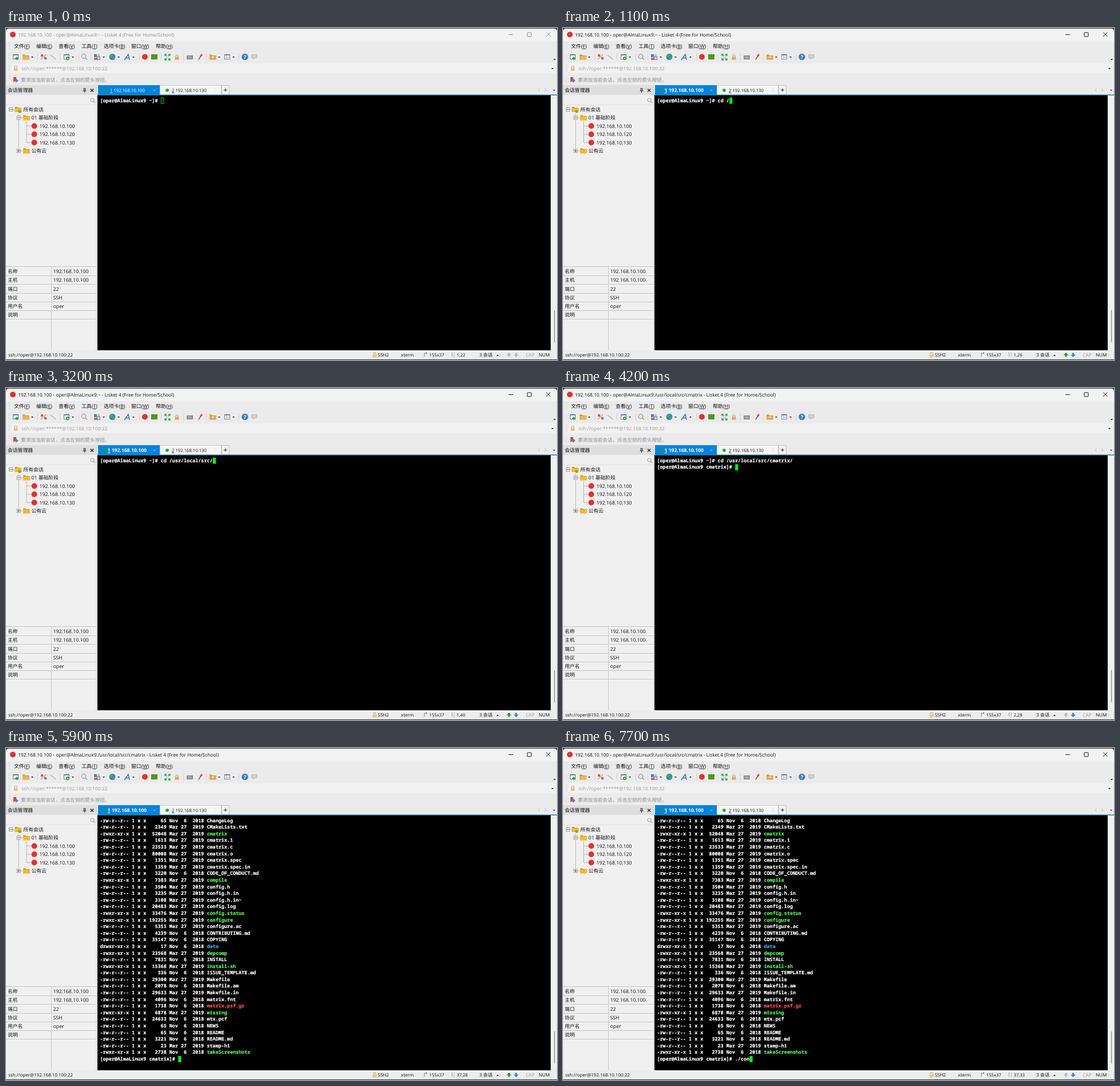
An HTML page for the animation above (8 s loop, 964x581 px).

```html
<!DOCTYPE html>
<html lang="zh">
<head>
<meta charset="utf-8">
<title>Terminal session</title>
<style>
html, body { margin: 0; width: 100%; height: 100%; overflow: hidden; background: #333; }
svg { display: block; width: 964px; height: 581px; }
text { font-family: "Open Sans", "Noto Sans CJK SC", "Noto Sans CJK", sans-serif; text-rendering: geometricPrecision; }
.term text { font: bold 8.44px "Noto Sans Mono", "DejaVu Sans Mono", monospace; }
.term text, .term tspan { fill: currentColor; stroke: currentColor; stroke-width: .2px; }
</style>
</head>
<body>
<svg id="stage" viewBox="0 0 964 581"></svg>
<script>
const LOOP = 8000, CELL = 5.065, ROW = 11.59, LEFT = 164.5, TOP = 121.8;
const USER = 'oper', IP = '192.168.10.100', APP = 'Lisket 4 (Free for Home/School)';

const keepSpaces = s => s.replace(/ /g, '\u00a0');
const rect = (x, y, w, h, fill, extra = '') => `<rect x="${x}" y="${y}" width="${w}" height="${h}" fill="${fill}" ${extra}/>`;
const box = (x, y, w, h, stroke, fill = 'none') => rect(x + .5, y + .5, w - 1, h - 1, fill, `stroke="${stroke}"`);
const circle = (x, y, r, fill, extra = '') => `<circle cx="${x}" cy="${y}" r="${r}" fill="${fill}" ${extra}/>`;
const path = (d, stroke, width = 1, extra = '') => `<path d="${d}" stroke="${stroke}" stroke-width="${width}" fill="none" ${extra}/>`;
const shape = (d, fill) => `<path d="${d}" fill="${fill}"/>`;
const text = (x, y, s, size = 8.75, fill = '#111', extra = '') =>
  `<text x="${x}" y="${y}" font-size="${size}" fill="${fill}" ${extra}>${s}</text>`;
const underlined = s => `<tspan text-decoration="underline">${s}</tspan>`;
const caret = (x, y) => shape(`M${x - 2} ${y - 1}h4l-2 2.3z`, '#222');
const folder = (x, y, fill = '#f7b92c') =>
  shape(`M${x} ${y - 4.5}h4l1.5 1.5h6v7.5h-11.5z`, '#e09b1a') + rect(x, y - 2, 11.5, 6, fill, 'rx=".8"');
const lock = (x, y, fill) => path(`M${x - 2} ${y}v-2a2 2 0 0 1 4 0v2`, '#c9a063', 1.1) + rect(x - 3.5, y - .5, 7, 5, fill, 'rx=".6"');
const lens = (x, y, r, color) => circle(x, y, r, 'none', `stroke="${color}" stroke-width="1.1"`) +
  path(`M${x + r * .7} ${y + r * .7}l3 3`, color, 1.4);
const expander = (x, y, plus) => box(x - 3.5, y - 3.5, 7, 7, '#999', '#fafafa') +
  path(`M${x - 2} ${y}h4${plus ? `M${x} ${y - 2}v4` : ''}`, '#333', .9);

function frame() {
  return rect(0, 0, 964, 581, '#333') + rect(0, 1, 964, 579, '#ebebeb', 'rx="5"') +
    shape('M0 23V6a5 5 0 0 1 5-5H959a5 5 0 0 1 5 5V23z', '#f3f3f3') +
    circle(12, 11.5, 5, '#e8302c');
}

function menus() {
  const items = [[14, '文件', 'F'], [53, '编辑', 'E'], [92, '查看', 'V'], [132, '工具', 'T'],
    [171, '选项卡', 'B'], [219, '窗口', 'W'], [262, '帮助', 'H']];
  return items.map(([x, word, key]) => text(x, 35, `${word}(${underlined(key)})`, 8.9)).join('');
}

function toolbar() {
  const grips = [26, 45, 65, 85].map(y => path(`M5.5 ${y}v11`, '#bbb', 1, 'stroke-dasharray="1 2"')).join('');
  const dividers = [55, 94, 127, 148, 233, 271, 310, 350, 407].map(x => path(`M${x}.5 44v13`, '#d2d2d2')).join('');
  const carets = [46, 117, 171, 197, 223, 373, 398].map(x => caret(x, 51)).join('');
  const windowIcon = (x, color) => box(x, 46, 10, 9, color, '#fff') + rect(x, 46, 10, 2, color);
  return grips + dividers + carets +
    windowIcon(12, '#5d7f9d') + path('M19 50v6M16 53h6', '#27a345', 1.8) +
    folder(29, 51, '#e9b25f') +
    path('M62 47l3 3M67 51l3 3', '#d9463e', 2) + box(61, 46, 4, 4, '#cf5b55') + box(67, 51, 4, 4, '#777') +
    path('M70 46l-4 4M65 51l-4 4', '#e04a40') +
    path('M78 47l4 4M82 50l5 5', '#c4c4c4', 2.4) +
    windowIcon(101, '#5d7f9d') + circle(108, 53, 3.2, '#45a83f') + circle(108, 53, 1.1, '#eee') +
    lens(136, 49.5, 3.8, '#8a8a8a') +
    rect(154, 46, 5, 5, '#477fb8') + rect(160, 46, 4, 4, '#bbb') + rect(154, 52, 5, 4, '#d6604e') + box(159, 50, 6, 6, '#5480a8', '#dbe7f2') +
    circle(186, 50.5, 5.5, '#2c83c7') + shape('M182 47l4-1 1 3-3 3-3-1zM187 51l4-1-2 5-3-1z', '#4dad51') +
    path('M207 56l7-10 2 10M210 52.5h5', '#2e72b3', 1.5) +
    circle(243, 50.5, 5, '#e8302c') + rect(254, 46, 11, 9, '#4c9a13') +
    path('M278 49v-3h3M278 46l3.5 3.5M287 49v-3h-3M287 46l-3.5 3.5M278 53v3h3M278 56l3.5-3.5M287 53v3h-3M287 56l-3.5-3.5', '#2ca03e', 1.3) +
    lock(299, 51, '#dba565') +
    rect(316, 48, 11, 7, '#858585', 'rx=".5"') + path('M317.5 50.5h8M317.5 52.7h8', '#ddd', .8) +
    path('M337 55l4-6', '#777', 2) + path('M340 50l3-4', '#d8534d', 3) +
    folder(356, 51, '#e4a456') + path('M362 49v4M360 51h4', '#fff') +
    windowIcon(382, '#70879b') + path('M386 48v7M386 51h6', '#8ca0b1') +
    circle(418, 50.5, 5.7, '#397fc6') + text(416, 54, '?', 9, '#fff', 'font-weight="bold"') +
    rect(429, 46, 11, 7, '#c3c3c3', 'rx="2"') + shape('M432 53h4l-4 3z', '#c3c3c3') + path('M431 48.5h7M431 50.5h7', '#eee', .7) +
    caret(960, 55);
}

function addressBar() {
  return rect(9, 62, 953, 17, '#f2f2f2') + lock(17, 70.5, '#edc184') +
    text(27, 74, `ssh://${USER}:******@${IP}:22`, 8.5, '#999') + caret(956, 71) +
    shape('M13 86h5v9l-2.5-2-2.5 2z', '#d8423d') + shape('M17 88l5 4-5 4z', '#4c83cf') +
    text(26, 94, '要添加当前会话，点击左侧的箭头按钮。', 8.65, '#8e8e8e');
}

function sidebar() {
  const tree = [[IP, 171.5], ['192.168.10.120', 186], ['192.168.10.130', 200.5]].map(([ip, y]) =>
    path(`M36 ${y}h8`, '#b5b5b5') + circle(49.5, y, 5, '#e8302c') + text(58.5, y + 3.1, ip)).join('');
  const facts = [['名称', IP], ['主机', IP], ['端口', '22'], ['协议', 'SSH'], ['用户名', USER], ['说明', '']];
  const table = facts.map(([name, value], i) => {
    const y = 418 + i * 15.25;
    return path(`M0 ${Math.round(y + 15) + .5}H158`, '#c6c6c6') + text(3, y + 11, name) + text(82.5, y + 11, value);
  }).join('');
  return rect(0, 100, 158, 17, '#dedede') + rect(0, 117, 159, 447, '#f0f0f0') +
    text(3, 112, '会话管理器', 8.8) +
    path('M135.5 106h4M136.5 106v4M138.8 106v4M134.5 110h6M137.5 110v3', '#222') +
    path('M148 106.5l5 5M153 106.5l-5 5', '#222', 1.3) +
    path('M0 134.5H158', '#e0e0e0') + lens(151, 126, 3, '#aaa') +
    path('M8.5 142.5h7M22 149v66M22 157h8M22 215h8M36 163v37.5', '#b5b5b5') +
    expander(8.5, 142.5) + folder(15.5, 142.5) + circle(24, 146, 2.7, '#79b532') + text(30.5, 145.8, '所有会话') +
    expander(22, 157) + folder(30, 157) + text(44.5, 160.2, '01 基础阶段') +
    tree + expander(22, 215, true) + folder(30, 215) + text(44.5, 218.3, '公有云') +
    path('M0 417.5H158M79.5 418V564', '#c6c6c6') + table + path('M158.5 100V564', '#d5d5d5');
}

function tabs() {
  return rect(160, 100, 804, 17, '#ebebeb') + rect(161, 100, 108, 17, '#0583e0') +
    box(269, 100, 108, 18, '#cfcfcf', '#f5f5f5') + box(377, 100, 14, 17, '#bdbdbd', '#f2f2f2') +
    rect(160, 116.5, 804, 1.5, '#2381ac') +
    circle(173, 109, 2.7, '#10a526') + circle(282, 109, 2.8, '#12ac1b') +
    text(290, 112, `${underlined(2)} 192.168.10.130`, 7.7) +
    path('M257.5 107l4 4M261.5 107l-4 4', '#8fc8f4', .8) + path('M365.5 107l4 4M369.5 107l-4 4', '#ddd', .8) +
    path('M381 108.5h6M384 105.5v6', '#333', 1.2) +
    path('M934 106l-3 2.5 3 2.5M942 106l3 2.5-3 2.5', '#bbb') + caret(959, 109);
}

function statusBar() {
  return rect(0, 564, 964, 16, '#ededed') +
    text(4, 575, `ssh://${USER}@${IP}:22`, 7.97) + lock(645, 572, '#f4c484') + text(650.5, 575, 'SSH2', 8.1) +
    text(691, 575, 'xterm', 8) + path('M732 575v-6h5M735 567.5l2 1.5-2 1.5', '#777', .9) + text(740.5, 575, '155x37', 7.75) +
    path('M780.5 568v7M783 569h2M783 572h2M783 575h2', '#999') + text(828, 575, '3 会话', 8.2) +
    shape('M858 574h4l-2-2.5z', '#222') + text(909.5, 575, 'CAP', 8.1, '#999') + text(932, 575, 'NUM', 8.1);
}

// Each entry: size, month (N/M), optional kind (x executable, d directory, z archive), name.
const listing = `65N ChangeLog|2349M CMakeLists.txt|52048Mx cmatrix|1613M cmatrix.1|23533M cmatrix.c|80008M cmatrix.o
1351M cmatrix.spec|1359M cmatrix.spec.in|3220N CODE_OF_CONDUCT.md|7383Mx compile|3504M config.h|3235M config.h.in
3108M config.h.in~|20483M config.log|33476Mx config.status|192255Mx configure|5351M configure.ac|4239N CONTRIBUTING.md
35147N COPYING|17Nd data|23568Mx depcomp|7831N INSTALL|15368Mx install-sh|336N ISSUE_TEMPLATE.md|29300M Makefile
2078N Makefile.am|29633M Makefile.in|4096N matrix.fnt|1738Nz matrix.psf.gz|6878Mx missing|24633N mtx.pcf|65N NEWS
65N README|3221N README.md|23M stamp-h1|2738Nx takeScreenshots`.split(/[|\n]/);
const kindColor = { x: '#55ff55', d: '#45a9e6', z: '#ff5555' };
const dates = { N: 'Nov  6  2018', M: 'Mar 27  2019' };

const termText = (row, s) => `<text x="${LEFT}" y="${TOP + row * ROW + 7.9}" color="#fff">${s}</text>`;

function listingRow(entry, row) {
  const [, size, month, kind, name] = entry.match(/^(\d+)([NM])(\w?) (.+)$/);
  const mode = kind === 'd' ? 'drwxr-xr-x 3' : kind === 'x' ? '-rwxr-xr-x 1' : '-rw-r--r-- 1';
  return termText(row, keepSpaces(`${mode} x x ${size.padStart(6)} ${dates[month]} `) +
    `<tspan color="${kindColor[kind] || '#fff'}">${name}</tspan>`);
}

const homePrompt = `[${USER}@AlmaLinux9 ~]# `, srcPrompt = `[${USER}@AlmaLinux9 cmatrix]# `;
const keys = {
  cd: [[300, 'c'], [500, 'd'], [600, ' '], [1100, '/'], [1300, 'u'], [1500, 'sr/'], [1700, 'l'], [1900, 'o'], [2100, 'cal/'],
    [2500, 's'], [2800, 'r'], [3000, 'c'], [3200, '/'], [3500, 'c'], [3700, 'm'], [4100, 'atrix/']],
  ll: [[5600, 'l'], [5700, 'l']],
  run: [[6500, '.'], [6700, '/'], [7300, 'c'], [7400, 'o'], [7500, 'n']]
};
const FOCUS = 200, CD_DONE = 4200, LL_DONE = 5900;
const sendToggles = [300, 800, 1100, 1400, 1500, 2000, 2100, 2700, 2800, 3400, 3500, 3900, 4100, 4200,
  5600, 6000, 6500, 6600, 6700, 6900, 7300, 7700];
const typed = (list, t) => list.filter(([at]) => at <= t).map(([, s]) => s).join('');

function screenRows(t) {
  const first = homePrompt + typed(keys.cd, t);
  if (t < CD_DONE) return { lines: [first], row: 0 };
  if (t < LL_DONE) return { lines: [first, srcPrompt + typed(keys.ll, t)], row: 1 };
  return { lines: [srcPrompt + typed(keys.run, t)], row: 36, listed: true };
}

const stage = document.getElementById('stage');
stage.innerHTML = frame() + menus() + toolbar() + addressBar() + sidebar() + tabs() +
  rect(160, 118, 793, 446, '#000') + rect(953, 118, 11, 446, '#f0f0f0') + statusBar() +
  '<g id="chrome"></g><g class="term"><g id="files"></g><g id="console"></g></g>';
const [chrome, files, consoleLayer] = ['chrome', 'files', 'console'].map(id => document.getElementById(id));
files.innerHTML = listing.map(listingRow).join('');

function draw(t) {
  const active = t >= FOCUS, ink = active ? '#111' : '#8c8c8c';
  const { lines, row, listed } = screenRows(t);
  const col = lines[lines.length - 1].length;
  const sending = sendToggles.filter(at => at <= t).length % 2;
  const place = t < CD_DONE ? '~' : '/usr/local/src/cmatrix';
  const tabLabel = `${underlined(1)} ${IP}`;

  chrome.innerHTML =
    text(21, 14.5, `${IP} - ${USER}@AlmaLinux9:${place} - ${APP}`, 8.35, ink) +
    path('M879 11.5h8', ink) + rect(912, 8, 7, 7, 'none', `stroke="${ink}" rx="1"`) +
    path('M945 7.5l7.5 7.5M952.5 7.5l-7.5 7.5', ink) +
    (active ? text(177.5, 112.2, tabLabel, 8.6, '#fff', 'font-weight="bold"') : text(182, 112, tabLabel, 7.7, '#fff')) +
    rect(959, listed ? 496 : 494, 1.3, 56, '#858585') +
    text(788.5, 575, `${row + 1},${col + 1}`, 7.7) +
    shape('M880 568l4.5 4.5h-3v3h-3v-3h-3z', sending ? '#16a01c' : '#b9b9b9') +
    shape('M892.5 576l4.5-4.5h-3v-3h-3v3h-3z', t >= 300 ? '#3c7fdc' : '#b9b9b9');

  files.style.display = listed ? '' : 'none';
  const x = LEFT + col * CELL, y = TOP + row * ROW;
  consoleLayer.innerHTML = lines.map((s, i) => termText(listed ? row : i, keepSpaces(s))).join('') +
    (active ? rect(x, y, 5.1, 10.8, '#00ff00') : rect(x + .5, y + .5, 4.4, 9.8, 'none', 'stroke="#00d900"'));
}

function tick() {
  draw(performance.now() % LOOP);
  requestAnimationFrame(tick);
}
tick();
</script>
</body>
</html>
```
